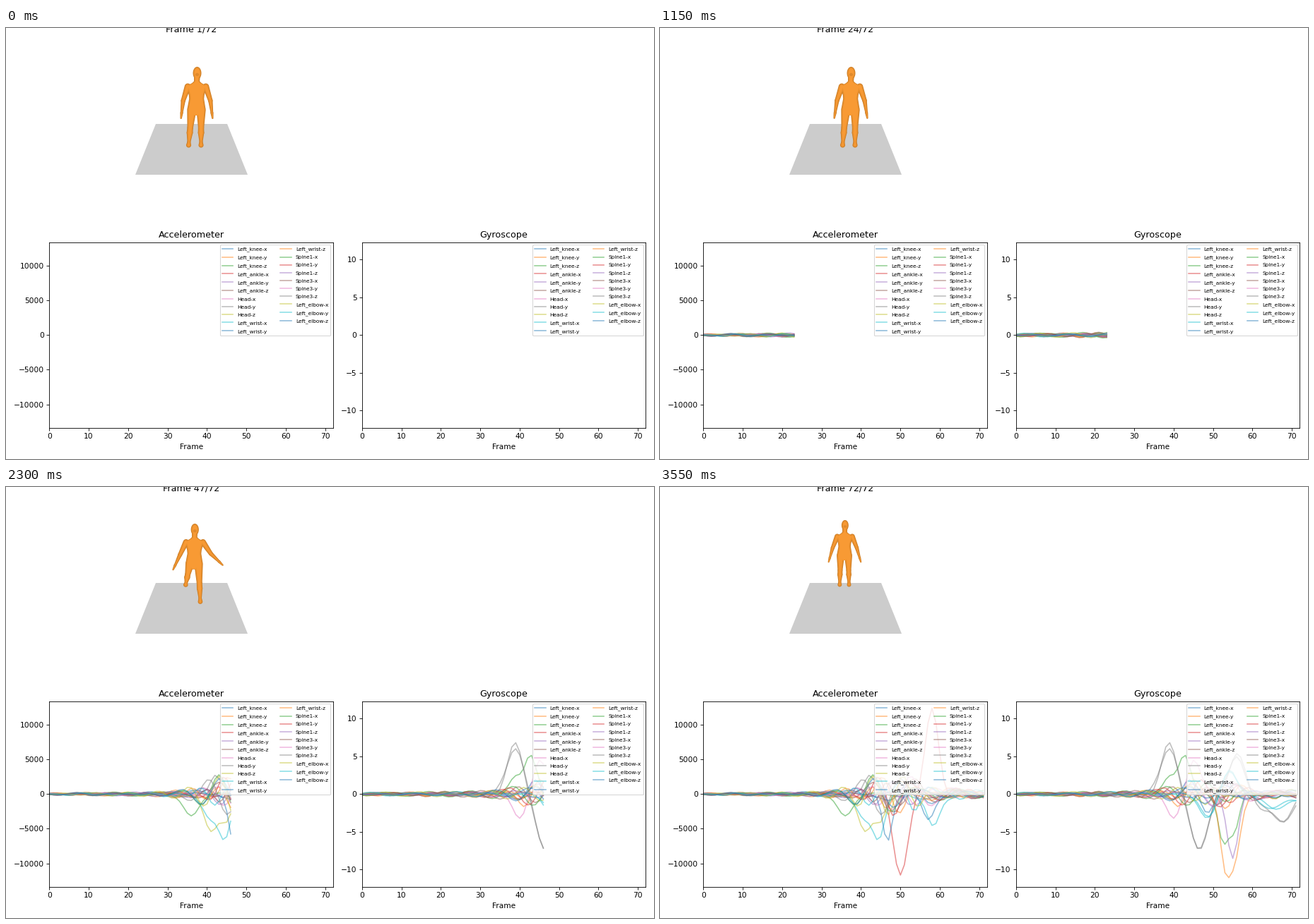
These frames come from a looping animation (917x611 px, 3.6 s). A matplotlib script:

```python
import numpy as np
import matplotlib.pyplot as plt
from matplotlib.animation import FuncAnimation
from matplotlib.collections import PolyCollection

W, H, DPI = 917, 611, 76.4
COUNT = 72
T = np.arange(COUNT)

fig = plt.figure(figsize=((W + 1e-6) / DPI, (H + 1e-6) / DPI), dpi=DPI, facecolor="white")


def bell(t, middle, width):
    return np.exp(-((t - middle) / width) ** 2)


def ease(t, start, end):
    u = np.clip((t - start) / (end - start), 0, 1)
    return u * u * (3 - 2 * u)


# ---------------------------------------------------------------- signals
JOINTS = ["Left_knee", "Left_ankle", "Head", "Left_wrist", "Spine1", "Spine3", "Left_elbow"]
LABELS = [f"{joint}-{axis}" for joint in JOINTS for axis in "xyz"]

# The strongest swings as (time, height, width); the rest is seeded noise
ACC_SWINGS = {
    "Left_knee-z": [(36, -3.2, 2.7)],
    "Left_ankle-x": [(50, -11.3, 2.7), (58, 12.2, 2.3)],
    "Head-y": [(42, 3.1, 1.9)],
    "Head-z": [(41, -5.5, 2.6), (45, -3.4, 1.9)],
    "Left_wrist-x": [(41, -3.6, 2.5), (44.5, -6.1, 2.1), (58.3, -5.2, 2.3)],
    "Left_wrist-y": [(46.7, -6.9, 1.7), (57, -3.7, 2.1)],
}
WHIRL = [(38.8, 6.4, 2.8), (46.5, -7.2, 3.1), (56, 5.5, 2.7), (66.5, -3.4, 5)]
TURN = [(48.5, -3.2, 2.8), (54, 3.2, 2.5), (67, -1.8, 5.5)]
GYR_SWINGS = {
    "Left_knee-z": [(39, 2.4, 2.4), (42.7, 5.2, 2), (52.5, -5.8, 1.8), (55.5, -4.8, 1.9)],
    "Head-x": [(40, -3.4, 2.4), (45, 4.7, 2.4)],
    "Head-y": WHIRL,
    "Spine3-z": WHIRL,
    "Left_wrist-x": TURN,
    "Left_elbow-y": TURN,
    "Left_wrist-z": [(53, -8, 1.8), (55.5, -8.8, 2.1)],
    "Spine1-z": [(55, -8.1, 2)],
}


def make_signals(swings, burst, seed):
    """Noise that grows while the body moves, plus the named swings."""
    rng = np.random.default_rng(seed)
    level = 0.13 + 0.004 * T + burst * bell(T, 48, 10)
    rows = []
    for name in LABELS:
        period = rng.uniform(6, 13, (3, 1))
        phase = rng.uniform(0, 2 * np.pi, (3, 1))
        row = level * np.sin(2 * np.pi * T / period + phase).sum(axis=0) / 1.7
        if name in swings:
            row = row * (0.13 + 0.004 * T) / level
            row += sum(height * bell(T, t, width) for t, height, width in swings[name])
        rows.append(row)
    return np.array(rows)


acc = 1000 * make_signals(ACC_SWINGS, 1.7, 4)
gyr = make_signals(GYR_SWINGS, 1.2, 9)


def make_plot(left, right, title, limit, step):
    top, bottom = 303.6, 567
    ax = fig.add_axes([left / W, 1 - bottom / H, (right - left) / W, (bottom - top) / H])
    lines = [ax.plot([], [], color=f"C{k % 10}", alpha=0.5, lw=1.5, label=name)[0]
             for k, name in enumerate(LABELS)]
    ax.set_xlim(0, COUNT)
    ax.set_ylim(-limit, limit)
    ax.set_yticks(np.arange(-2, 3) * step)
    ax.set_title(title)
    ax.set_xlabel("Frame")
    ax.legend(loc="upper right", ncol=2, fontsize=7, labelspacing=0.66,
              columnspacing=2.2, handlelength=2.1)
    return lines


acc_lines = make_plot(61.3, 463, "Accelerometer", 13410, 5000)
gyr_lines = make_plot(504, 905.3, "Gyroscope", 12.33, 5)

# ---------------------------------------------------------------- figure
stage = fig.add_axes([0, 0, 1, 1], zorder=-1)
stage.set_xlim(0, W)
stage.set_ylim(H, 0)
stage.axis("off")
stage.fill([212, 313, 342, 183], [136, 136, 208, 208], color="#cccccc", lw=0)
title = stage.text(262, 5, "", fontsize=12, ha="center", va="baseline")

SHADES = [("#cb7c24", 0), ("#e08b2d", 0.7), ("#ee9430", 1.5), ("#f89a34", 2.5)]
# Half width of the trunk from neck to crotch
TRUNK_AT = [-.06, .02, .15, .5, .65, 1.05, 1.3]
TRUNK_HALF = [3.6, 6, 14.5, 11, 10.5, 13, 5]


def limb(p, q, rp, rq):
    """Tapered capsule from p to q."""
    turn = np.arctan2(q[1] - p[1], q[0] - p[0])
    a = turn + np.linspace(-np.pi / 2, np.pi / 2, 9)
    unit = np.column_stack([np.cos(a), np.sin(a)])
    return np.vstack([q + rq * unit, p - rp * unit])


def oval(c, rx, ry):
    a = np.linspace(0, 2 * np.pi, 28)
    return np.column_stack([c[0] + rx * np.cos(a), c[1] + ry * np.sin(a)])


def blend(a, b, u):
    return np.array(a) + u * (np.array(b) - np.array(a))


def reach(side, degrees, length):
    """Step outwards, measured from straight down."""
    a = np.radians(degrees)
    return length * np.array([side * np.sin(a), np.cos(a)])


def pose(i):
    """The body hops back: left foot first, then the right, arms swinging out."""
    back = ease(i, 36, 60)
    s = 1 - 0.17 * back
    pelvis = blend((269.5, 113), (261, 95), back)
    sway = 0.06 * np.sin(np.pi * i / 36) ** 2 + 0.25 * back
    lifts = sway + bell(i, 51, 5), sway + bell(i, 45, 4.5)
    feet = (blend((258.5, 166), (254.3, 138.5), ease(i, 34, 46)),
            blend((276, 166), (267.5, 138.5), ease(i, 44, 53)))
    return s, pelvis, lifts, feet


def body_parts(i, inset):
    s, pelvis, lifts, feet = pose(i)
    neck = pelvis + s * np.array([0.5, -36])
    head = pelvis + s * np.array([1, -49])

    def r(size):
        return max(size * s - inset, 0.3)

    spine = np.linspace(TRUNK_AT[0], TRUNK_AT[-1], 30)
    half = [[r(w), 0] for w in np.interp(spine, TRUNK_AT, TRUNK_HALF)]
    centre = neck + spine[:, None] * (pelvis - neck)
    parts = [
        oval(head, r(6), r(9)),
        limb(head, neck, r(4.5), r(4)),
        np.vstack([centre - half, (centre + half)[::-1]]),
    ]
    for side, lift, foot in zip((-1, 1), lifts, feet):
        shoulder = neck + s * np.array([side * 12.8, 6])
        elbow = shoulder + reach(side, 18 + 15 * lift, 21 * s)
        hand = elbow + reach(side, 7 + 36 * lift, 25 * s)
        wrist = blend(elbow, hand, 0.7)
        parts += [limb(shoulder, elbow, r(4.5), r(3.2)), limb(elbow, wrist, r(3.2), r(1.8)),
                  limb(wrist, hand, r(2.1), r(1.2))]

        hip = pelvis + s * np.array([side * 6.6, 3])
        knee = blend(hip, foot, 0.5)
        calf = blend(knee, foot, 0.3)
        ankle = blend(knee, foot, 0.82)
        parts += [limb(hip, knee, r(6.6), r(4.2)), limb(knee, calf, r(4.2), r(4.4)),
                  limb(calf, ankle, r(4.4), r(2.4)), limb(ankle, foot, r(2.5), r(3.6))]
    return parts, head, s


layers = [stage.add_collection(PolyCollection([], facecolors=shade, edgecolors="none",
                                              zorder=3 + z), autolim=False)
          for z, (shade, _) in enumerate(SHADES)]
face = stage.add_collection(
    PolyCollection([], facecolors="#e08a2c", edgecolors="none", zorder=8), autolim=False)


def draw(i):
    title.set_text(f"Frame {i + 1}/{COUNT}")
    for lines, rows in ((acc_lines, acc), (gyr_lines, gyr)):
        for line, row in zip(lines, rows):
            line.set_data(T[:i + 1], row[:i + 1])
    for layer, (_, inset) in zip(layers, SHADES):
        parts, head, s = body_parts(i, inset)
        layer.set_verts(parts)
    face.set_verts([oval(head + [0, 2 * s], 2.6 * s, 2.2 * s)])
    return [title, face, *layers, *acc_lines, *gyr_lines]


anim = FuncAnimation(fig, draw, frames=COUNT, interval=50, repeat=True, repeat_delay=0)
plt.show()
```
